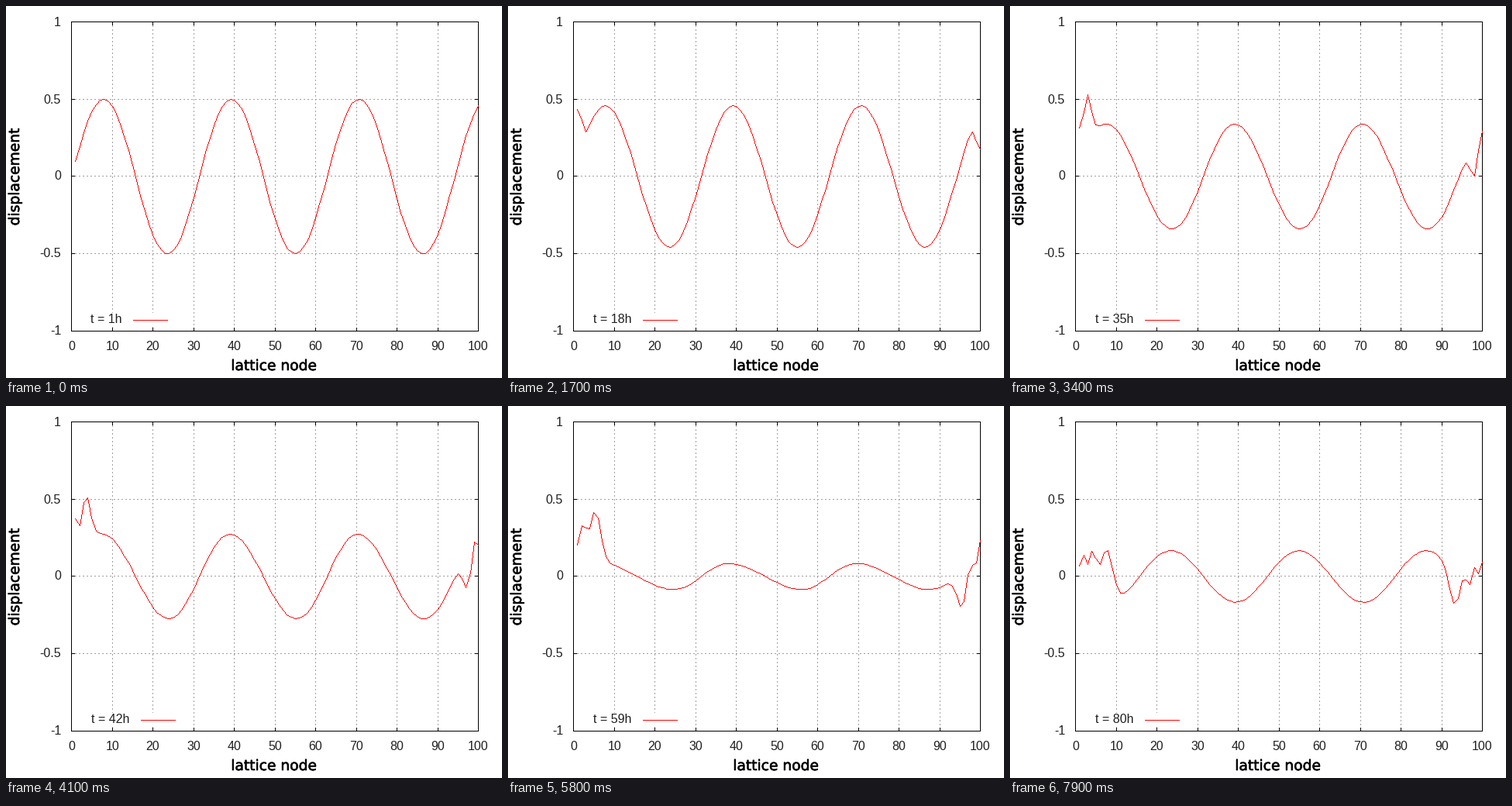
Animation, 640 px wide and 480 px high, one loop 8 s. Source, as a matplotlib script:

```python
import numpy as np
import matplotlib.pyplot as plt
from matplotlib.animation import FuncAnimation
from matplotlib.patheffects import withStroke

W, H, DPI = 640, 480, 100
PX = 72 / DPI                      # one pixel in points
LEFT, RIGHT, TOP, BOTTOM = 84.5, 609.5, 20.5, 419.5
NODES, FRAMES, SUBSTEPS = 100, 80, 10
STEP, ALPHA = 0.0121, -0.5         # time step, quadratic spring term
RED, INK = "#ff0000", "#202020"


def to_x(node):
    return LEFT + (RIGHT - LEFT) * node / 100


def to_y(u):
    return (TOP + BOTTOM) / 2 - (BOTTOM - TOP) / 2 * u


def pixel(v):
    return np.floor(v) + 0.5


def accel(u):
    stretch = np.roll(u, -1) - u
    force = stretch + ALPHA * stretch ** 2
    return force - np.roll(force, 1)


def simulate():
    """Periodic nonlinear chain, released at rest from a sine wave."""
    u = 0.5 * np.sin(0.2 * np.arange(1, NODES + 1))
    v = np.zeros(NODES)
    a = accel(u)
    states = []
    for step in range(1, SUBSTEPS * (FRAMES - 1) + 2):
        v += a * STEP / 2
        u = u + v * STEP
        a = accel(u)
        v += a * STEP / 2
        if step % SUBSTEPS == 1:
            states.append(u)
    return states


def trace(u):
    """One pixel wide, hard-edged polyline through the nodes."""
    layer = np.zeros((H, W, 4), dtype=np.uint8)
    xs = np.floor(to_x(np.arange(1, NODES + 1))).astype(int)
    ys = np.floor(to_y(u) - 0.01).astype(int)
    for x0, y0, x1, y1 in zip(xs, ys, xs[1:], ys[1:]):
        count = max(abs(x1 - x0), abs(y1 - y0)) + 1
        cols = np.floor(np.linspace(x0, x1, count) + 0.5).astype(int)
        rows = np.floor(np.linspace(y0, y1, count) + 0.5).astype(int)
        layer[rows, cols] = (255, 0, 0, 255)
    return layer


fig = plt.figure(figsize=(W / DPI, H / DPI), dpi=DPI, facecolor="white")
ax = fig.add_axes([0, 0, 1, 1])
ax.set_xlim(0, W)
ax.set_ylim(H, 0)
ax.axis("off")


def stroke(xs, ys, color="black", **style):
    return ax.plot(xs, ys, color=color, lw=PX, antialiased=False,
                   snap=False, solid_capstyle="butt", **style)[0]


def label(x, y, text, **style):
    style = {"ha": "center", "va": "baseline", "color": INK,
             "fontsize": 16 * PX, "family": "Liberation Sans", **style}
    return ax.text(x, y, text, **style)


GRID = dict(color="#a0a0a0", dashes=(2, 3), dash_capstyle="butt", zorder=1)
TITLE = dict(fontsize=18.67 * PX, family="DejaVu Sans", color="black",
             path_effects=[withStroke(linewidth=0.6 * PX, foreground="black")])
KEY_TOP, KEY_BOTTOM = 396, 414
TICK = 4

for value in range(0, 101, 10):
    x = pixel(to_x(value))
    if 0 < value < 100:
        if value <= 20:            # the grid leaves room for the key
            stroke([x, x], [TOP, KEY_TOP], **GRID)
            stroke([x, x], [KEY_BOTTOM + 0.5, BOTTOM], **GRID)
        else:
            stroke([x, x], [TOP, BOTTOM], **GRID)
        stroke([x, x], [BOTTOM, BOTTOM - TICK], zorder=3)
        stroke([x, x], [TOP, TOP + TICK], zorder=3)
    label(x, 443.5, str(value))

for value in (-1, -0.5, 0, 0.5, 1):
    y = pixel(to_y(value) - 0.1)
    if abs(value) < 1:
        stroke([LEFT, RIGHT], [y, y], **GRID)
        stroke([LEFT, LEFT + TICK], [y, y], zorder=3)
        stroke([RIGHT, RIGHT - TICK], [y, y], zorder=3)
    label(71, y + 5, f"{value:g}", ha="right")

stroke([LEFT, RIGHT, RIGHT, LEFT, LEFT], [TOP, TOP, BOTTOM, BOTTOM, TOP],
       zorder=3, solid_joinstyle="miter")
label(345.5, 470, "lattice node", **TITLE)
label(17, 220.5, "displacement", rotation=90, rotation_mode="anchor", **TITLE)

states = simulate()
curve = ax.imshow(trace(states[0]), extent=(0, W, H, 0), aspect="auto",
                  interpolation="nearest", zorder=4)
key_text = label(149.5, 409, "", ha="right")
key_line = stroke([164, 209], [405.5, 405.5], RED, zorder=4)


def draw(i):
    hour = i + 1
    shift = 10 if hour > 9 else 0
    curve.set_data(trace(states[i]))
    key_text.set_text(f"t = {hour}h")
    key_text.set_x(149.5 + shift)
    key_line.set_xdata([164 + shift, 209 + shift])
    return curve, key_text, key_line


anim = FuncAnimation(fig, draw, frames=FRAMES, interval=100,
                     repeat=True, repeat_delay=0, blit=False)
plt.show()
```
